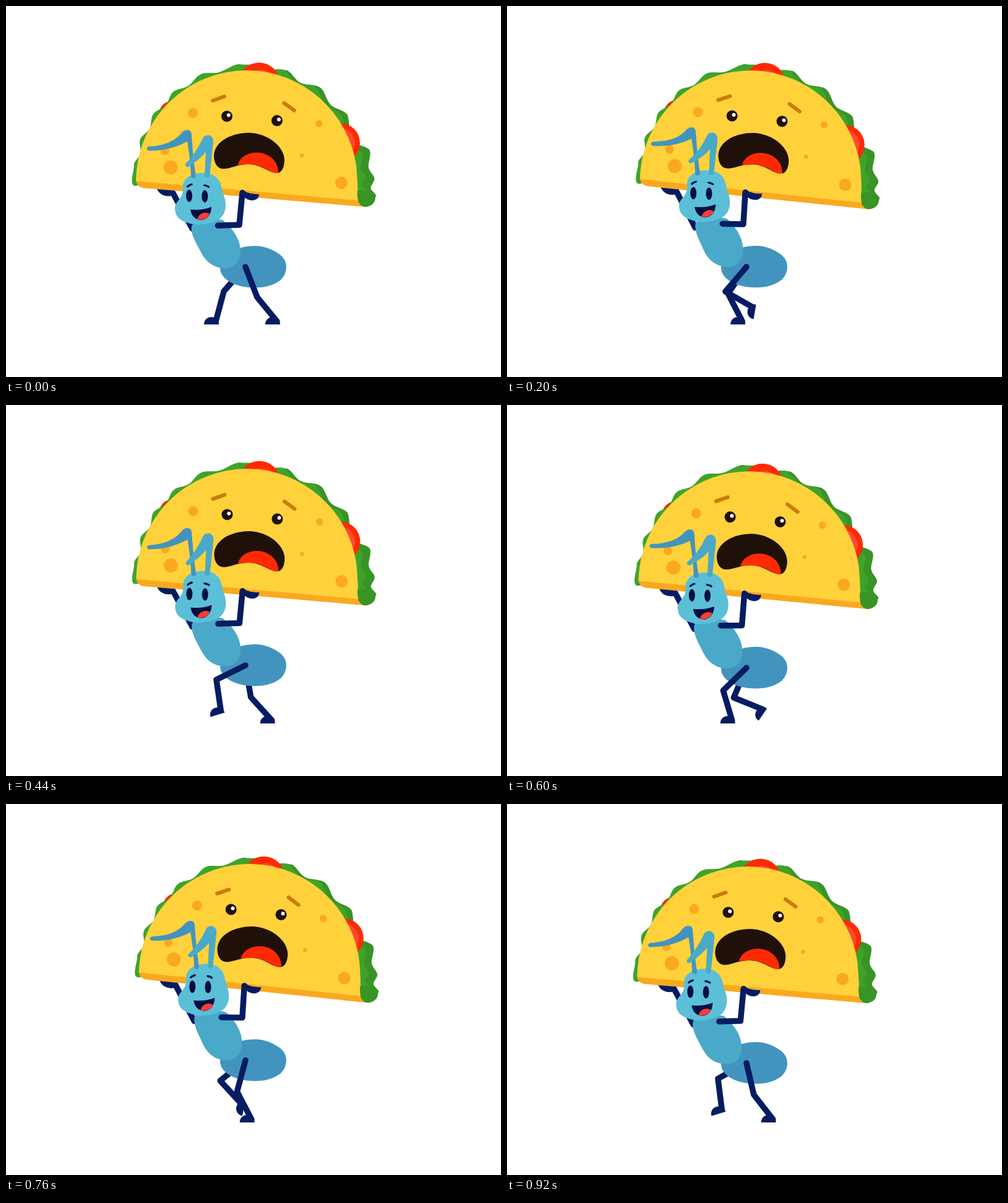
An HTML page that plays this animation: 800x600 px, repeating every 960 ms.

```html
<!DOCTYPE html>
<html lang="en">
<head>
<meta charset="utf-8">
<title>Ant carrying a taco</title>
<style>
html, body { margin: 0; width: 100%; height: 100%; overflow: hidden; background: #fff; }
svg { display: block; width: 100vw; height: 100vh; }
.limb { fill: none; stroke: #051c62; stroke-width: 9.5; stroke-linecap: round; stroke-linejoin: round; }
.navy { fill: #051c62; }
.ink { fill: #030f42; }
.leaf { fill: #3fa32b; }
.dark { fill: #389425; }
.red { fill: #ff2a05; }
.pale { fill: #ff4a30; }
.spot { fill: #f9a91f; }
.soot { fill: #20100a; }
</style>
</head>
<body>
<svg viewBox="0 0 800 600">
  <g id="taco">
    <path class="navy" d="M243 294Q248 307 262 307.500Q271 308 273 300L273 290Z"/>
    <path class="limb" d="M269 301L301 360"/>
    <circle class="red" cx="268" cy="175" r="21"/>
    <path id="leafLeft" class="leaf"/>
    <path id="leafRight" class="dark"/>
    <path id="leafRightInner" class="leaf"/>
    <path id="leafEnd" class="dark"/>
    <path id="leafEndInner" class="leaf"/>
    <circle class="red" cx="409" cy="125" r="33.500"/>
    <circle class="pale" cx="412" cy="125" r="22"/>
    <circle class="red" cx="540" cy="221.500" r="32"/>
    <circle class="pale" cx="540" cy="221.500" r="24"/>
    <path fill="#ffd13b" d="M210 283A180 180 0 0 1 391 104A180 180 0 0 1 566 258Q569 290 569 317L224 292Z"/>
    <path class="spot" d="M210 281Q211 284 216 283.500L568 314.500Q571 322 581 325L224 294.500Q211 293 210 281Z"/>
    <path class="dark" d="M568 298Q566 325 582 325Q597 322 597 309L590 298Z"/>
    <g class="spot">
      <circle cx="302" cy="173" r="8"/><circle cx="266" cy="261" r="11.400"/>
      <circle cx="257" cy="234" r="7"/><circle cx="506" cy="190" r="5.700"/>
      <circle cx="478" cy="242" r="3.300"/><circle cx="542" cy="286" r="10"/>
    </g>
    <path d="M334 153L353 146.300M449.500 157L466 169" fill="none" stroke="#cb7c07" stroke-width="6" stroke-linecap="round"/>
    <circle class="soot" cx="357" cy="178.300" r="9"/><circle cx="359.800" cy="176.500" r="3" fill="#fff"/>
    <circle class="soot" cx="438" cy="185.300" r="9"/><circle cx="441" cy="183.500" r="3" fill="#fff"/>
    <path class="soot" d="M348 263C340 261 336 252 336 242C337 219 364 205 393 205C424 206 450 228 450 249C450 260 446 270 438 270C424 270 414 256 391 256C372 256 360 265 348 263Z"/>
    <path class="red" d="M374.500 258C377 245 390 237 405 237C424 237 440 250 440 269.500Q437 271 431 269C420 264 411 256 391 256Q381 256 374.500 258Z"/>
  </g>
  <g class="navy"><path id="farLeg" class="limb"/><path id="farFoot"/></g>
  <path id="rear" fill="#4294be" d="M346 423C346 403 372 388 402 388C420 388 433 395 444 403Q453 411 453 422Q453 434 444 443C434 451 420 455.500 402 455.500C372 455.500 346 443 346 423Z"/>
  <path id="chest" fill="#4aa9c9" d="M300 356C298 370 308 384 315 398C323 414 336 424 354 424C370 424 379 413 379 396C379 378 367 360 350 346L310 340Z"/>
  <g id="head">
    <path fill="#5bbfd7" d="M286 296C284 279 299 270 318 270C338 270 347 281 349 296C351 306 355 311 355 322C355 342 341 348 330 351C318 354 308 355 298 352C282 348 273 341 273 328C273 314 286 314 286 296Z"/>
    <path id="farFeeler" fill="#4294be"/>
    <path id="nearFeeler" fill="#4aa9c9"/>
    <ellipse class="ink" cx="296" cy="307" rx="5" ry="10"/>
    <ellipse class="ink" cx="321.300" cy="307.700" rx="5" ry="10"/>
    <path d="M293.500 292Q296 289.500 300 288.500M320.500 290Q325 290.500 327.500 292.500" fill="none" stroke="#030f42" stroke-width="3.200" stroke-linecap="round"/>
    <path class="ink" d="M298 329Q316 331 332 325C332 336 326 346 315 346C305 346 299 338 298 329Z"/>
    <path fill="#ff3b35" d="M309 345C312 335 321 332 329 336C327 343 319 347 309 345Z"/>
  </g>
  <path id="arm" class="limb"/>
  <path id="hand" class="navy" d="M377.500 302Q381 294 388 301Q398 305 409 304Q409 313 399 314.500Q389 314 384 308Z"/>
  <g class="navy"><path id="nearLeg" class="limb"/><path id="nearFoot"/></g>
</svg>
<script>
const $ = id => document.getElementById(id);
const set = (id, name, value) => $(id).setAttribute(name, value);
const LOOP = 960, HALF = LOOP / 2, STEP = 40;
const HIP = { x: 387, y: 422 }, THIGH = 52.5, SHIN = 50.5;
const SHELL = { x: 389, y: 284 };
const FLOOR = 510, FRONT = 339, STRIDE = 99;

const wave = (t, period, peak = 0) => Math.cos(2 * Math.PI * (t - peak) / period);
const mix = (a, b, k) => a + (b - a) * k;

// Point around the centre of the shell, angle in degrees
function polar(deg, r) {
  const a = deg * Math.PI / 180;
  return [SHELL.x + r * Math.cos(a), SHELL.y - r * Math.sin(a)];
}

// Closed smooth outline through points
function blob(p) {
  const at = i => p[(i + p.length) % p.length];
  let d = 'M' + p[0];
  p.forEach((a, i) => {
    const b = at(i + 1), q = at(i - 1), r = at(i + 2);
    const c1 = a.map((v, k) => v + (b[k] - q[k]) / 6);
    const c2 = b.map((v, k) => v - (r[k] - a[k]) / 6);
    d += `C${c1} ${c2} ${b}`;
  });
  return d + 'Z';
}

// Lettuce edge: crests and dips alternate between two angles
function frill(id, { from, to, crests, r0, r1, dip, ease = 1, pad = 8 }) {
  const side = Math.sign(to - from), n = 2 * (crests - 1);
  const p = [polar(from - side * pad, 165)];
  for (let i = 0; i <= n; i++) {
    const k = i / n;
    p.push(polar(mix(from, to, k ** ease), mix(r0, r1, k) - (i % 2) * dip));
  }
  p.push(polar(to + side * pad, 165));
  set(id, 'd', blob(p));
}

// One foot: slides back on the ground, then swings forward in an arc
function ankle(t) {
  t %= LOOP;
  if (t < HALF) return { x: FRONT + STRIDE * t / HALF, y: FLOOR, deg: 0 };
  const u = t / HALF - 1;
  return {
    x: FRONT + STRIDE * (1 - u),
    y: FLOOR - 58.5 * u ** 0.75 * Math.sqrt(1 - u),
    deg: -84 * Math.sin(Math.PI * u) ** 1.2
  };
}

// Two-bone leg with the knee bending forward
function drawLeg(name, t, bob) {
  const { x, y, deg } = ankle(t);
  const hx = HIP.x, hy = HIP.y + bob;
  const dx = x - hx, dy = y - hy, d = Math.hypot(dx, dy);
  const along = (THIGH ** 2 - SHIN ** 2 + d * d) / (2 * d);
  const out = Math.sqrt(Math.max(0, THIGH ** 2 - along ** 2));
  const kx = hx + (dx * along - dy * out) / d, ky = hy + (dy * along + dx * out) / d;
  set(name + 'Leg', 'd', `M${hx} ${hy}L${kx} ${ky}L${x} ${y}`);
  set(name + 'Foot', 'transform', `translate(${x} ${y}) rotate(${deg})`);
}

function draw(t) {
  const bob = -1.63 + 5.5 * wave(t, HALF, 86.5) + 1.41 * wave(t, LOOP, 320);
  const sway = (1 - wave(t, HALF)) / 2;
  const lift = -1.9 - 2.5 * wave(t, HALF, 160);
  const near = lift / 2;

  set('taco', 'transform', `translate(0 ${bob}) rotate(${1.17 * sway} 375 530)`);
  set('rear', 'transform', `translate(0 ${bob})`);
  set('chest', 'transform', `translate(0 ${bob}) rotate(${3.4 * sway} 388 440)`);
  set('head', 'transform', `translate(${5.6 * sway} ${bob - 4.4 * sway})`);
  set('hand', 'transform', `translate(${3.4 * sway} ${bob - 0.6 * sway})`);

  const joint = (x, y, dx, dy) => `${x + dx * sway} ${y + dy * sway + bob}`;
  set('arm', 'd', `M${joint(342.5, 355, 6.2, -2.7)}L${joint(377, 354, 5.3, -1)}L${joint(382, 302, 3.4, -0.6)}`);

  const tip = 231 + lift, mid = lift * 0.6;
  set('farFeeler', 'd', `M299 276Q298 248 293 219Q265 ${235 + mid} 230 ${tip + 3.5}Q225 ${tip} 230 ${tip - 3}` +
    `Q268 ${226 + mid} 284 205Q289 199 296 201Q300 203 300 210Q302 245 307 276Q303 281 299 276Z`);
  set('nearFeeler', 'd', `M321 275Q322 256 323 236C314 247 305 ${253 + near} ${295 + near} ${260.5 + near}` +
    `Q${290 + near} ${261 + near} ${290 + near} ${256 + near}Q307 238 317 216Q320 208 328 209Q335 211 335 219Q333 240 329 275Q325 280 321 275Z`);

  drawLeg('far', t, bob);
  drawLeg('near', t + HALF, bob);
}

const upper = { from: 71, to: 33, crests: 3, r0: 191, r1: 195, dip: 10 };
const lower = { from: 15, to: -7, crests: 3, r0: 204, r1: 209, dip: 7, ease: 0.7, pad: 4 };
frill('leafLeft', { from: 93, to: 172, crests: 6, r0: 190, r1: 184, dip: 7, ease: 0.85 });
frill('leafRight', upper);
frill('leafRightInner', { ...upper, from: 73, to: 35, r0: 190, r1: 187 });
frill('leafEnd', lower);
frill('leafEndInner', { ...lower, from: 14, to: -5, r0: 192, r1: 194 });
for (const name of ['far', 'near'])
  set(name + 'Foot', 'd', 'M5 5H-19C-19 -2 -14 -7 -7 -7C0 -7 5 -2 5 5Z');

const start = performance.now();
function tick() {
  const t = (performance.now() - start) % LOOP;
  draw(Math.floor(t / STEP) * STEP);
  requestAnimationFrame(tick);
}
draw(0);
requestAnimationFrame(tick);
</script>
</body>
</html>
```
